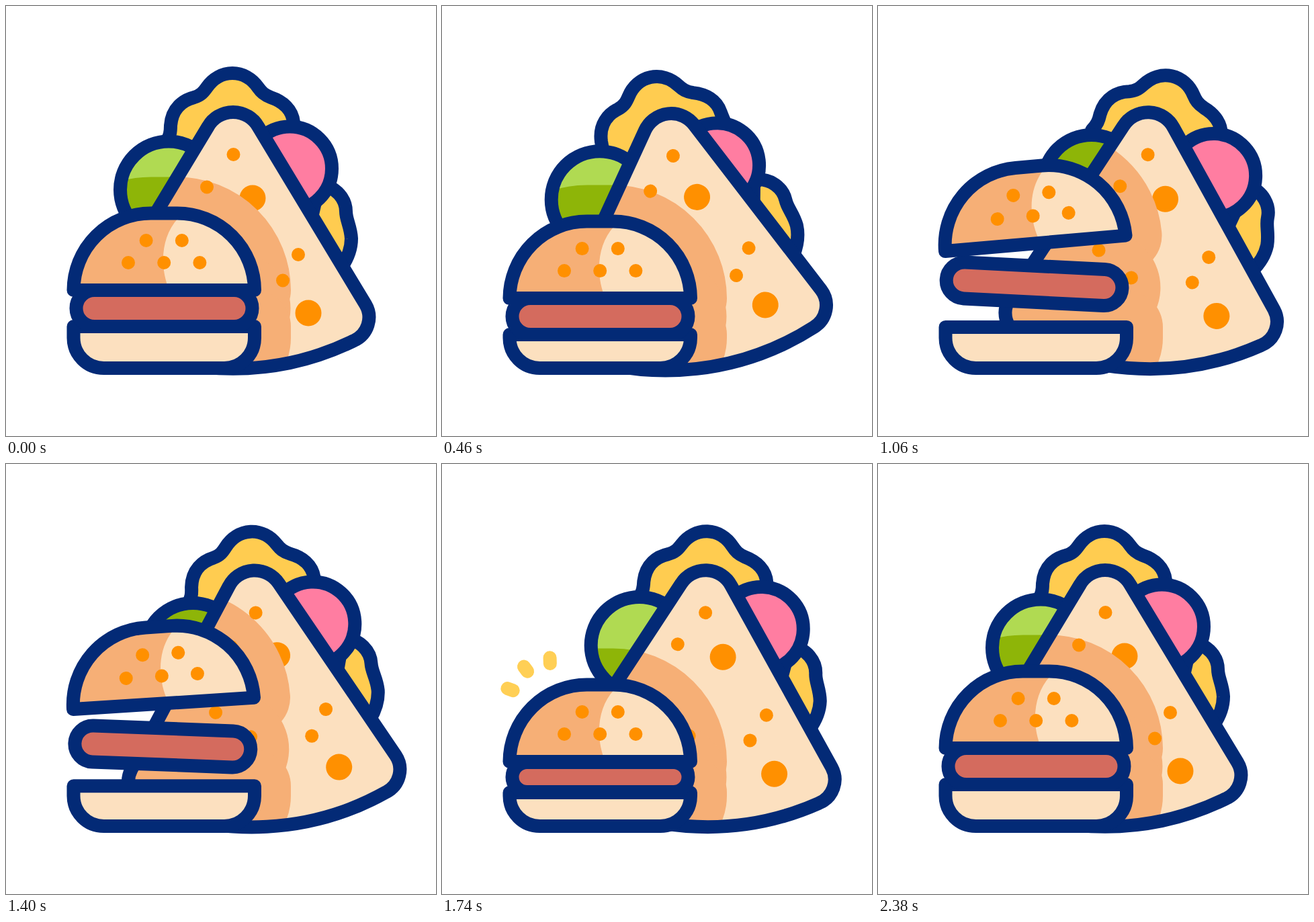
These frames come from a looping animation (640x640 px, 2400 ms). An HTML page:

```html
<!DOCTYPE html>
<html lang="en">
<head>
<meta charset="utf-8">
<title>Burger and sandwich</title>
<style>
html, body { margin: 0; width: 100%; height: 100%; overflow: hidden; background: #fff; }
svg { display: block; width: 100vw; height: 100vh; }
.line { stroke: #032a76; stroke-width: 20; stroke-linejoin: round; stroke-linecap: round; }
.seed { fill: #ff9000; }
.leaf { fill: #ffcc50; }
.shade { stroke-width: 108; stroke-linejoin: round; }
.tan { fill: #f6af76; stroke: #f6af76; }
.moss { fill: #8eb508; stroke: #8eb508; }
</style>
</head>
<body>
<svg viewBox="0 0 640 640">
  <defs>
    <path id="wedge" d="M301 179A43 43 0 0 1 375 179L535 444A38 38 0 0 1 518 498A408 408 0 0 1 158 498A38 38 0 0 1 141 444Z"/>
    <path id="dome" d="M100.5 423A115 115 0 0 1 215.5 308.5H255A115 115 0 0 1 370 423Z"/>
    <path id="base"/>
    <rect id="patty" x="104.5" width="262"/>
    <circle id="dot" r="10"/>
    <clipPath id="wedgeClip"><use href="#wedge" class="wedgePose"/></clipPath>
    <clipPath id="limeClip"><circle class="limePose" r="72"/></clipPath>
    <g id="shadow" class="shade">
      <use href="#dome" class="domePose"/>
      <use href="#patty" class="pattyPose" stroke-width="114"/>
      <use href="#base"/>
    </g>
  </defs>

  <g class="wedgePose">
    <path id="leafLow" class="leaf line" d="M466 266C492 268 506 288 506 306C506 318 513 328 514 346C514 362 508 376 500 388L440 380Z"/>
    <path id="leafTop" class="leaf line" d="M238 204C244 194 245 188 245 178C247 152 264 140 280 136C290 133 294 128 299 121C308 108 322 100 337 100C352 100 366 108 375 121C380 128 384 132 394 136C412 142 426 154 428 173C430 188 434 200 434 215L338 260Z"/>
  </g>

  <circle class="limePose" r="72" fill="#b0da52"/>
  <g clip-path="url(#limeClip)"><use href="#shadow" class="moss"/></g>
  <circle class="limePose line" r="72" fill="none"/>
  <g class="wedgePose"><circle id="ham" class="line" r="62.5" fill="#ff7da1"/></g>

  <use href="#wedge" class="wedgePose" fill="#fce0bf"/>
  <g class="wedgePose seed">
    <circle cx="367" cy="286" r="19.5"/>
    <circle cx="450" cy="457" r="19.5"/>
  </g>
  <g clip-path="url(#wedgeClip)"><use href="#shadow" class="tan"/></g>
  <g class="wedgePose seed">
    <use href="#dot" x="338.5" y="221"/>
    <use href="#dot" x="299" y="269.5"/>
    <use href="#dot" x="435" y="370"/>
    <use href="#dot" x="412" y="408.5"/>
    <use href="#dot" x="321" y="405"/>
    <use href="#dot" x="271" y="366"/>
  </g>
  <use href="#wedge" class="wedgePose line" fill="none"/>

  <use href="#base" class="line" fill="#fce0bf"/>
  <use href="#patty" class="pattyPose line" fill="#d46b5e"/>
  <g class="domePose">
    <use href="#dome" fill="#fce0bf"/>
    <path fill="#f6af76" d="M100.5 423A115 115 0 0 1 215.5 308.5H264C231 335 227 385 243 423Z"/>
    <g id="sesame" class="seed"></g>
    <use href="#dome" class="line" fill="none"/>
  </g>
  <g id="sparks" stroke="#ffcf55" stroke-width="20" stroke-linecap="round"></g>
</svg>
<script>
const LOOP = 2400;
const byId = id => document.getElementById(id);

function set(el, attrs) {
  for (const k in attrs) el.setAttribute(k, attrs[k]);
}

function add(parent, tag, attrs = {}) {
  const el = document.createElementNS('http://www.w3.org/2000/svg', tag);
  set(el, attrs);
  return parent.appendChild(el);
}

function pose(name, transform) {
  document.querySelectorAll(`.${name}Pose`).forEach(el => set(el, { transform }));
}

// 0 to 1 between times a and b, eased at both ends.
function ramp(t, a, b) {
  const p = Math.min(1, Math.max(0, (t - a) / (b - a)));
  return (1 - Math.cos(Math.PI * p)) / 2;
}

// Rises from a to b, falls back from c to d.
const hold = (t, a, b, c, d) => ramp(t, a, b) - ramp(t, c, d);
const bump = (t, a, b, c) => hold(t, a, b, b, c);

// Swing of the fillings behind the bread.
function lag(t, delay) {
  const back = 460 + delay, front = 1060 + delay;
  return 0.75 * bump(t, back, front, 1420) - bump(t, 80, back, front)
    + 0.3 * bump(t, 1740, 1960, 2360);
}

// Height of one burger layer: pressed down, thrown up, landed.
function layerY(t, lift, land, fall) {
  return 12.2 * hold(t, 60, 490, 540, 1170)
    - lift * hold(t, 540, 1170, fall, 1680)
    + land * hold(t, fall, 1680, 1760, 2080);
}

function drawSandwich(t) {
  const slide = 50.6 * hold(t, 200, 560, 1640, 2000);
  const tilt = 6 * bump(t, 540, 887, 1290) - 6.9 * bump(t, 60, 540, 887)
    + 4 * bump(t, 1290, 1960, 2380) - 3.6 * bump(t, 887, 1290, 1960);
  const wedge = `translate(${slide} 0) rotate(${tilt} 338 544)`;
  pose('wedge', wedge);

  const round = lag(t, 50);
  const drop = 9 * Math.max(round, 0);
  pose('lime', `${wedge} translate(${242 + 20 * round} ${273.5 - drop}) rotate(${-tilt})`);
  set(byId('ham'), { cx: 422.5 + 21 * round, cy: 242 + drop });

  const leaf = lag(t, -50);
  const turn = leaf * (leaf > 0 ? 14 : 6);
  set(byId('leafTop'), { transform: `rotate(${turn} 338 285)` });
  set(byId('leafLow'), { transform: `rotate(${turn} 500 388)` });
}

function drawBurger(t) {
  const spin = hold(t, 520, 1120, 1250, 1680);
  pose('dome', `translate(${-spin} ${layerY(t, 76, 20, 1330)}) rotate(${-5.1 * spin} 235 423)`);
  pose('patty', `translate(${-3 * spin} ${layerY(t, 40, 16, 1290)}) rotate(${3 * spin} 235.5 450)`);
  const r = 27 - 5 * hold(t, 1620, 1690, 1760, 2000);
  set(byId('patty'), { y: 450 - r, height: 2 * r, rx: r, ry: r });
  const top = 477 + layerY(t, 0, 12, 1290);
  set(byId('base'), { d: `M100.5 ${top}H370V494A45 45 0 0 1 325 539H145.5A45 45 0 0 1 100.5 494Z` });
}

function drawSparks(t) {
  const tail = 61 + 34 * ramp(t, 1770, 1980);
  const head = 61 + 34 * ramp(t, 1690, 1840);
  set(byId('sparks'), { visibility: head - tail > 0.1 ? 'visible' : 'hidden' });
  sparks.forEach((el, i) => {
    const a = (200 + 34 * i) * Math.PI / 180;
    const x = r => 163 + r * Math.cos(a), y = r => 358 + r * Math.sin(a);
    set(el, { x1: x(tail), y1: y(tail), x2: x(head), y2: y(head) });
  });
}

for (let i = 0; i < 5; i++) {
  add(byId('sesame'), 'use', { href: '#dot', x: 182 + 26.6 * i, y: i % 2 ? 349 : 382 });
}
const sparks = [0, 1, 2].map(() => add(byId('sparks'), 'line'));

function draw(t) {
  drawSandwich(t);
  drawBurger(t);
  drawSparks(t);
}

const start = performance.now();
function tick(now) {
  draw(Math.max(0, now - start) % LOOP);
  requestAnimationFrame(tick);
}
draw(0);
requestAnimationFrame(tick);
</script>
</body>
</html>
```
